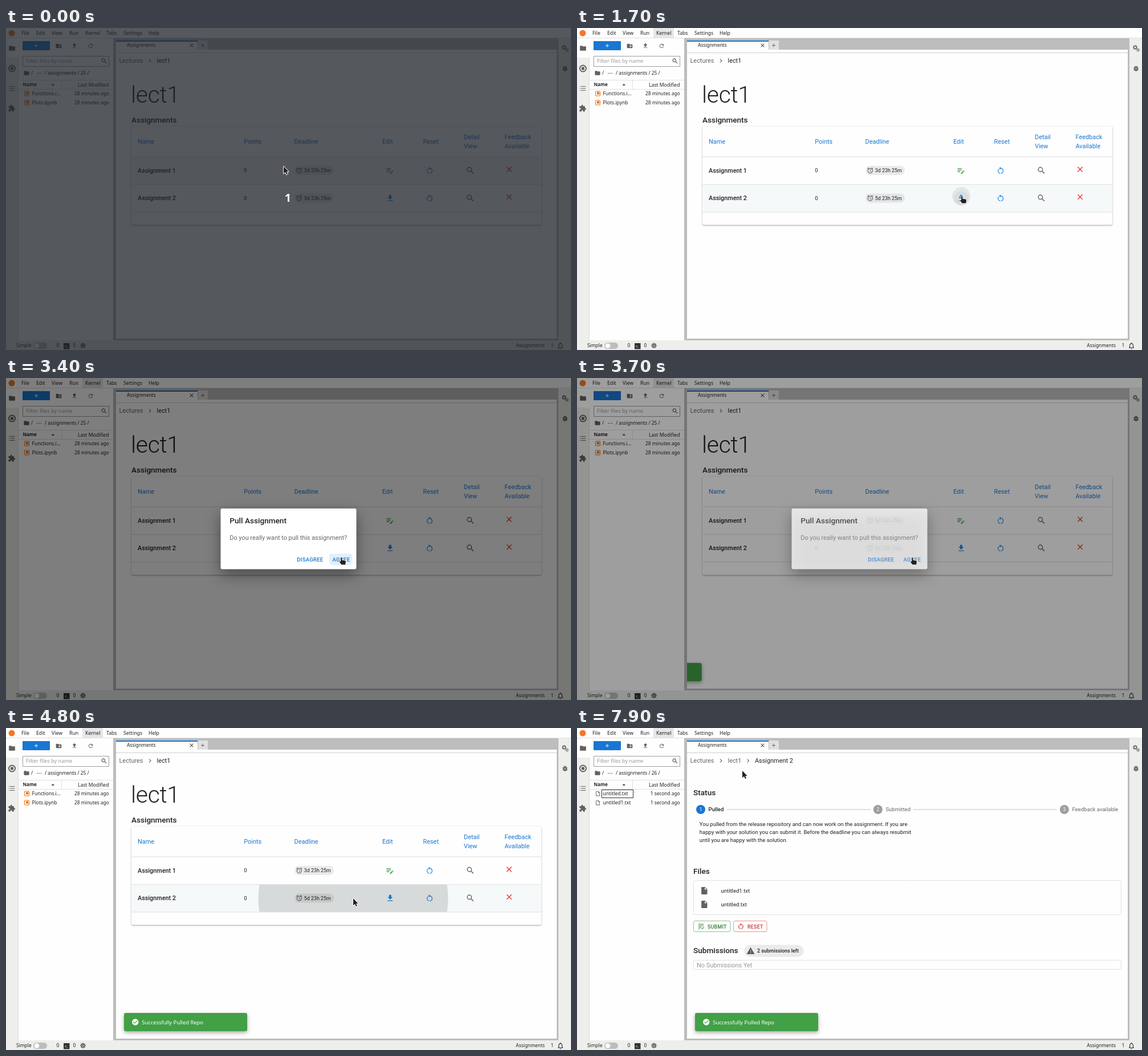
Animation of 991 by 565 pixels, one loop 8000 ms. Source, as an HTML page with a canvas:

```html
<!DOCTYPE html>
<html lang="en">
<head>
<meta charset="utf-8">
<title>Assignments</title>
<style>
html, body { margin: 0; width: 100%; height: 100%; overflow: hidden; background: #fff; }
canvas { display: block; width: 991px; height: 565px; }
</style>
</head>
<body>
<canvas id="stage"></canvas>
<script>
const W = 991, H = 565, LOOP = 8000, STEP = 100;
const canvas = document.getElementById('stage');
const c = canvas.getContext('2d');
const dpr = window.devicePixelRatio || 1;
canvas.width = W * dpr;
canvas.height = H * dpr;

const INK = '#212121', GREY = '#616161', BLUE = '#1976d2', SKY = '#1e88e5', RED = '#e53935', GREEN = '#43a047';
const LINE = '#e0e0e0', BAR = '#eeeeec', DOCK = '#bdbdbd', PAPER = '#fefefe';
const UI = '"Noto Sans", "Open Sans", sans-serif', BODY = 'Roboto, sans-serif';

// Icons on a 24 unit grid
const ICONS = {
  folder: 'M10 4H4c-1.1 0-2 .9-2 2v12c0 1.1.9 2 2 2h16c1.1 0 2-.9 2-2V8c0-1.1-.9-2-2-2h-8l-2-2z',
  addFolder: 'M20 6h-8l-2-2H4c-1.1 0-2 .9-2 2v12c0 1.1.9 2 2 2h16c1.1 0 2-.9 2-2V8c0-1.1-.9-2-2-2zm-1 8h-3v3h-2v-3h-3v-2h3V9h2v3h3v2z',
  search: 'M15.5 14h-.8l-.3-.3A6.5 6.5 0 1 0 13.7 14.4l.3.3v.8l5 5 1.5-1.5zM9.5 14a4.5 4.5 0 1 1 0-9 4.5 4.5 0 0 1 0 9z',
  close: 'M19 6.4L17.6 5 12 10.6 6.4 5 5 6.4 10.6 12 5 17.6 6.4 19 12 13.4 17.6 19 19 17.6 13.4 12z',
  add: 'M19 13h-6v6h-2v-6H5v-2h6V5h2v6h6z',
  download: 'M5 20h14v-2H5zM19 9h-4V3H9v6H5l7 7z',
  upload: 'M5 20h14v-2H5zM5 10h4v6h6v-6h4l-7-7z',
  refresh: 'M17.65 6.35A8 8 0 1 0 19.73 14h-2.08A6 6 0 1 1 16.2 7.8L13 11h7V4z',
  restart: 'M12 5V2L8 6l4 4V7a6 6 0 0 1 1 11.9v2A8 8 0 0 0 12 5zM6 13c0-1.65.67-3.15 1.76-4.24L6.34 7.34A8 8 0 0 0 11 20.93v-2.02A6 6 0 0 1 6 13z',
  alarm: 'M22 5.7l-4.6-3.8-1.3 1.5 4.6 3.9zM7.9 3.4L6.6 1.9 2 5.7l1.3 1.5zM12.5 8H11v6l4.7 2.9.8-1.3-4-2.3zM12 4a9 9 0 1 0 0 18 9 9 0 0 0 0-18zm0 16a7 7 0 1 1 0-14 7 7 0 0 1 0 14z',
  done: 'M12 2a10 10 0 1 0 0 20 10 10 0 0 0 0-20zm-2 15l-5-5 1.4-1.4 3.6 3.6 7.6-7.6L19 8z',
  file: 'M6 2a2 2 0 0 0-2 2v16a2 2 0 0 0 2 2h12a2 2 0 0 0 2-2V8l-6-6zm7 7V3.5L18.5 9z',
  page: 'M6 2a2 2 0 0 0-2 2v16a2 2 0 0 0 2 2h12a2 2 0 0 0 2-2V8l-6-6zm0 2h7v5h5v11H6z',
  warning: 'M1 21h22L12 2zm12-3h-2v-2h2zm0-4h-2v-4h2z',
  editNote: 'M3 10h11v2H3zM3 6h11v2H3zM3 14h7v2H3zM18 12.9l1.4-1.4 2.2 2.1-1.5 1.4zM17.3 13.6L12 18.9V21h2.1l5.3-5.3z',
  submit: 'M3 3h18v2H3zM3 8h18v2H3zM3 13h10v2H3zM3 18h7v2H3zM21.5 13l1.4 1.4-6.4 6.4-4-4 1.4-1.4 2.6 2.6z',
  list: 'M7 5h14v2H7zM7 11h14v2H7zM7 17h14v2H7zM3 5h2v2H3zM3 11h2v2H3zM3 17h2v2H3z',
  puzzle: 'M20.5 11H19V7a2 2 0 0 0-2-2h-4V3.5a2.5 2.5 0 0 0-5 0V5H4a2 2 0 0 0-2 2v3.8h1.5a2.7 2.7 0 0 1 0 5.4H2V20c0 1.1.9 2 2 2h3.8v-1.5a2.7 2.7 0 0 1 5.4 0V22H17a2 2 0 0 0 2-2v-4h1.5a2.5 2.5 0 0 0 0-5z',
  bug: 'M20 8h-2.8L15.4 6 17 4.4 15.6 3l-2.2 2.2h-2.8L8.4 3 7 4.4 8.6 6 6.8 8H4v2h2v2H4v2h2v2H4v2h2.8a6 6 0 0 0 10.4 0H20v-2h-2v-2h2v-2h-2v-2h2zm-6 8h-4v-2h4zm0-4h-4v-2h4z',
  bell: 'M12 22a2 2 0 0 0 2-2h-4a2 2 0 0 0 2 2zM18 16v-5c0-3-1.6-5.6-4.5-6.3V4a1.5 1.5 0 0 0-3 0v.7C7.6 5.4 6 8 6 11v5l-2 2v1h16v-1zm-2 1H8v-6c0-2.5 1.5-4.5 4-4.5s4 2 4 4.5z',
  right: 'M10 6L8.6 7.4 13.2 12l-4.6 4.6L10 18l6-6z'
};
for (const k in ICONS) ICONS[k] = new Path2D(ICONS[k]);

const ARROW = new Path2D('M0 0V12.4L2.9 9.8 4.9 14 7 13 5.1 9H8.6Z');
const HAND = new Path2D('M0 .8C0-.5 2.2-.5 2.2.8V4.6L7.6 5.6C8.6 5.8 9 6.4 8.9 7.4L8.2 12.5H1.6L-2 8.2C-2.6 7.2-1.6 6.4-.8 7L0 7.6Z');

// cubic-bezier(.4, 0, .2, 1)
function ease(x) {
  if (x <= 0) return 0;
  if (x >= 1) return 1;
  let lo = 0, hi = 1, s = .5;
  for (let i = 0; i < 24; i++) {
    s = (lo + hi) / 2;
    const q = 1 - s;
    if (1.2 * q * q * s + .6 * q * s * s + s * s * s < x) lo = s; else hi = s;
  }
  return s * s * (3 - 2 * s);
}

function box(x, y, w, h, fill, r = 0, stroke) {
  c.beginPath();
  c.roundRect(x, y, w, h, r);
  if (fill) { c.fillStyle = fill; c.fill(); }
  if (stroke) { c.strokeStyle = stroke; c.lineWidth = 1; c.stroke(); }
}
function disc(x, y, r, fill) {
  c.beginPath();
  c.arc(x, y, r, 0, 7);
  c.fillStyle = fill;
  c.fill();
}
function ring(x, y, r, width, color) {
  c.beginPath();
  c.arc(x, y, r, 0, 7);
  c.lineWidth = width;
  c.strokeStyle = color;
  c.stroke();
}
function shadowBox(x, y, w, h, fill, r, blur, dy, alpha) {
  c.save();
  c.shadowColor = `rgba(0,0,0,${alpha})`;
  c.shadowBlur = blur * dpr;
  c.shadowOffsetY = dy * dpr;
  box(x, y, w, h, fill, r);
  c.restore();
}
function clip(x, y, w, h, draw) {
  c.save();
  c.beginPath();
  c.rect(x, y, w, h);
  c.clip();
  draw();
  c.restore();
}
function icon(name, x, y, size, color = GREY) {
  c.save();
  c.translate(x - size / 2, y - size / 2);
  c.scale(size / 24, size / 24);
  c.fillStyle = color;
  c.fill(ICONS[name], 'evenodd');
  c.restore();
}
function write(font, s, x, y, size, color = INK, weight = 400, align = 'left', spacing = 0) {
  c.font = `${weight} ${size}px ${font}`;
  c.textAlign = align;
  c.letterSpacing = spacing + 'px';
  c.fillStyle = color;
  c.fillText(s, x, y + size * .355);
}
const ui = (...a) => write(UI, ...a);
const body = (...a) => write(BODY, ...a);
const caps = (s, x, y, size, color) => body(s, x, y, size, color, 500, 'left', size * .0286);

function gear(x, y, r) {
  ring(x, y, r * .68, r * .4, GREY);
  for (let i = 0; i < 8; i++) {
    const a = i * Math.PI / 4;
    disc(x + Math.cos(a) * r, y + Math.sin(a) * r, r * .24, GREY);
  }
}

function ripple(t, start, release, x, y, radius, gain, rgb = '0,0,0') {
  if (t < start) return;
  const k = ease((t - start) / 550);
  const a = gain * (.1 + .2 * k) * (1 - ease((t - release) / 550));
  if (a > 0) disc(x, y, radius * k, `rgba(${rgb},${a})`);
}

const PATH = [
  [0, 487, 243], [400, 487, 243], [1200, 674, 295], [2000, 674, 295], [2500, 601, 304], [2900, 587, 315],
  [4200, 587, 315], [4400, 609, 299], [6400, 609, 299], [6500, 605, 296], [6900, 440, 176],
  [7000, 440, 176], [7600, 309, 98], [7800, 309, 98], [7900, 290, 75], [8000, 290, 75]
];
function pointerAt(t) {
  const i = PATH.findIndex(p => p[0] > t);
  const [t0, x0, y0] = PATH[i - 1], [t1, x1, y1] = PATH[i];
  const k = (t - t0) / (t1 - t0);
  return { x: x0 + (x1 - x0) * k, y: y0 + (y1 - y0) * k };
}

function drawMenu(t) {
  box(0, 0, W, 17, PAPER);
  box(0, 17, W, 1, LINE);
  disc(10, 9, 5.5, '#f37726');
  if (t >= 100) box(134, 0, 36, 17, '#e6e6e6');
  const items = { File: 27, Edit: 53, View: 80, Run: 111, Kernel: 139, Tabs: 176, Settings: 206, Help: 250 };
  for (const s in items) ui(s, items[s], 9, 8.7);
}

function drawSidebars() {
  box(0, 18, 22, 530, BAR);
  box(0, 18, 22, 34, PAPER);
  box(21, 52, 1, 496, '#dcdcdc');
  icon('folder', 10.5, 35.5, 13);
  disc(10.5, 71, 6.5, GREY);
  disc(10.5, 71, 4.6, BAR);
  box(8, 68.5, 5, 5, GREY);
  icon('list', 10, 106, 14);
  icon('puzzle', 10, 141, 13.5);
  box(969, 18, 22, 530, BAR);
  gear(979, 34, 3.4);
  gear(984, 38.5, 2.5);
  icon('bug', 980.5, 71, 12.5);
}

function drawStatus() {
  box(0, 548, W, 17, BAR);
  ui('Simple', 18, 557, 8.4);
  box(48, 552, 24, 11, DOCK, 5.5);
  disc(54, 557.5, 4.3, '#fff');
  ui('0', 88.5, 557, 8.5);
  box(101, 553, 10.5, 10.5, '#333');
  ui('s_', 103, 558, 6, '#fff');
  ui('0', 117.5, 557, 8.5);
  gear(135, 557.3, 4);
  disc(135, 557.3, 1.2, GREY);
  ui('Assignments', 945, 557, 8.4, INK, 400, 'right');
  ui('1', 955.5, 557, 8.5);
  icon('bell', 972.5, 557.5, 14, '#333');
}

function drawFiles(pulled) {
  box(22, 18, 166, 530, PAPER);
  box(29, 23, 48, 16, BLUE, 1);
  icon('add', 53, 31, 10, '#fff');
  icon('addFolder', 92.5, 31.5, 11.5);
  icon('upload', 120, 31, 11.5);
  icon('refresh', 148.5, 31.5, 11);
  box(29.5, 49.5, 151, 18, null, 0, '#9e9e9e');
  ui('Filter files by name', 35, 58, 9.2, '#9a9a9a');
  icon('search', 172, 58, 12, '#424242');
  icon('folder', 36, 79, 11);
  ui('/', 44, 79, 8.4);
  for (let i = 0; i < 3; i++) disc(55 + i * 3.2, 79.5, .8, '#424242');
  ui(`/ assignments / ${pulled ? 26 : 25} /`, 68, 79, 8.4);
  box(22, 91, 166, 1, LINE);
  box(22, 107, 166, 1, LINE);
  box(97, 92, 1, 15, LINE);
  ui('Name', 29.5, 99, 8.1, INK, 600);
  c.fillStyle = '#424242';
  c.fill(new Path2D('M79.5 100.8L82.3 97.8L85.1 100.8Z'));
  ui('Last Modified', 180.5, 100, 8.6, INK, 400, 'right');
  const names = pulled ? ['untitled.txt', 'untitled1.txt'] : ['Functions.i...', 'Plots.ipynb'];
  names.forEach((name, i) => {
    const y = 115 + i * 16;
    if (pulled) icon('page', 36.5, y, 10.5);
    else {
      box(32.5, y - 4, 8, 8, null, .5, '#ef6c00');
      c.fillStyle = '#ef6c00';
      c.fill(new Path2D(`M35 ${y - 2.5}H39V${y + 2.5}L37 ${y + .8}L35 ${y + 2.5}Z`));
    }
    ui(name, 45.5, y, 8.5);
    ui(pulled ? '1 second ago' : '28 minutes ago', 180.5, y, 8.3, INK, 400, 'right');
  });
  if (pulled) box(43.5, 108.5, 55, 14, null, 0, '#333');
}

function drawDock() {
  box(188, 18, 781, 530, DOCK);
  box(193, 38, 773, 507, PAPER);
  box(193, 22, 143, 17, PAPER);
  box(193, 22, 143, 2, BLUE);
  box(193, 43, 773, 1, '#cfcfcf');
  ui('Assignments', 212, 30.5, 8.4);
  icon('close', 325.5, 30.5, 11, '#424242');
  box(337, 22, 17, 16, LINE);
  icon('add', 345, 30.5, 10);
}

function crumbs(names) {
  const xs = [198.5, 264.5, 312];
  names.forEach((s, i) => {
    const last = i === names.length - 1;
    body(s, xs[i], 57.5, 10.9, last ? INK : '#666');
    if (!last) icon('right', i ? 300 : 252.5, 57.5, 13);
  });
}

function drawRow(t, n, hovered) {
  const top = n === 1 ? 226.5 : 275, y = n === 1 ? 250 : 298.5;
  if (hovered) box(220.5, top, 718, 47.5, '#f6f9f9');
  body('Assignment ' + n, 231, y, 10.8, INK, 500);
  body('0', 417.2, y, 9.5);
  box(506, y - 8, 69, 16, 'rgba(0,0,0,.08)', 8);
  icon('alarm', 514.3, y, 12.2, '#555');
  body(n === 1 ? '3d 23h 25m' : '5d 23h 25m', 522.8, y + .3, 8.86);
  if (n === 1) icon('editNote', 673.5, y, 16, GREEN);
  else icon('download', 673.8, y, 15.5, SKY);
  icon('restart', 743, y, 15.5, SKY);
  icon('search', 814.5, y, 16.4);
  icon('close', 882.5, y - 2, 16, RED);
}

function drawLecture(t, mouse) {
  crumbs(['Lectures', 'lect1']);
  body('lect1', 219, 116.5, 40.9, INK, 300, 'left', -.34);
  body('Assignments', 220, 161, 13.5, INK, 500);
  shadowBox(220, 172.5, 719, 173, PAPER, 3, 2.5, 1, .38);
  const heads = [['Name', 231], ['Points', 417.3], ['Deadline', 505.5], ['Edit', 660], ['Reset', 731.5]];
  for (const [s, x] of heads) body(s, x, 199, 10.9, BLUE);
  [['Detail', 'View', 803], ['Feedback', 'Available', 874.5]].forEach(([a, b, x]) => {
    body(a, x, 191, 10.9, BLUE);
    body(b, x, 207, 10.9, BLUE);
  });
  const free = t < 1850 || t >= 4000;
  drawRow(t, 1, free && mouse.y < 274);
  drawRow(t, 2, free && mouse.y >= 274);
  for (const y of [225.5, 274, 322.5]) box(220, y, 719, 1, LINE);

  if (t >= 1100 && t < 1850) disc(674, 299, 13, 'rgba(0,0,0,.04)');
  clip(220, 275, 719, 47.5, () => {
    ripple(t, 1637, 1900, 674, 295, 454, .7);
    ripple(t, 1600, 1900, 674, 299, 13, .8);
    ripple(t, 4623, 4730, 609, 299, 390, .7);
  });
}

function drawStep(n, x, label, active) {
  disc(x, 143, 8, active ? BLUE : '#9e9e9e');
  body(n, x, 143, 8.2, '#fff', 400, 'center');
  body(label, x + 13.6, 143, 9.54, active ? INK : '#666', active ? 500 : 400);
}

function drawAssignment(t) {
  crumbs(['Lectures', 'lect1', 'Assignment 2']);
  body('Status', 204, 113, 13.6, INK, 500);
  drawStep('1', 217, 'Pulled', true);
  drawStep('2', 527.8, 'Submitted');
  drawStep('3', 854.8, 'Feedback available');
  box(263, 142.5, 252, 1, DOCK);
  box(590, 142.5, 251, 1, DOCK);
  ['You pulled from the release repository and can now work on the assignment. If you are',
    'happy with your solution you can submit it. Before the deadline you can always resubmit',
    'until you are happy with the solution.'
  ].forEach((s, i) => body(s, 214.8, 168.5 + i * 14, 9.54));

  body('Files', 204, 251.5, 13.6, INK, 500);
  box(204.5, 267.5, 750, 60, null, 3, LINE);
  if (t >= 5200) {
    if (t < 6600) box(205, 297.5, 749, 24, '#f5f5f5');
    ['untitled1.txt', 'untitled.txt'].forEach((s, i) => {
      icon('file', 223.3, 285.5 + i * 24, 15.5);
      body(s, 252.5, 285.5 + i * 24, 9.54);
    });
  }
  box(204.5, 338.5, 64.5, 19, null, 3, 'rgba(46,125,50,.5)');
  icon('submit', 217.5, 348.5, 12.5, '#2e7d32');
  caps('SUBMIT', 229, 348.5, 8.86, '#2e7d32');
  box(274.5, 338.5, 58.5, 19, null, 3, 'rgba(211,47,47,.5)');
  icon('restart', 287.5, 348, 13, '#d32f2f');
  caps('RESET', 299, 348.5, 8.86, '#d32f2f');

  body('Submissions', 204, 390.5, 13.6, INK, 500);
  box(293, 380.5, 104.5, 21, '#ebebeb', 10.5);
  icon('warning', 304.5, 391, 15, '#555');
  body('2 submissions left', 316, 391.3, 8.86, INK, 500);
  box(204.5, 407.5, 750, 16, null, 2, LINE);
  body('No Submissions Yet', 210, 415.7, 10.9, '#999');
}

function drawSnack(t) {
  if (t < 3690) return;
  const p = Math.min(1, (t - 3690) / 225);
  clip(193, 44, 773, 501, () => {
    c.translate(-230 * Math.pow(1 - p, 2.6), 0);
    shadowBox(207, 500, 216, 32, '#42a046', 3, 7, 2.5, .35);
    icon('done', 226.8, 516, 13.6, '#fff');
    ui('Successfully Pulled Repo', 238.3, 516.3, 9.4, '#fff');
  });
}

function drawDialog(t) {
  const leave = ease((t - 3651) / 195);
  const dim = ease((t - 1882) / 225) - leave;
  const show = ease((t - 1858) / 225) - leave;
  if (dim > 0) box(0, 0, W, H, `rgba(0,0,0,${.5 * dim})`);
  if (show <= 0) return;
  c.save();
  c.globalAlpha = show;
  shadowBox(376.5, 229, 238, 106.5, '#fff', 3, 26, 10, .4);
  body('Pull Assignment', 392.3, 250, 13.6, INK, 500);
  body('Do you really want to pull this assignment?', 392.3, 279.8, 10.9, '#666');
  if (t >= 2600 && t < 3600) box(567, 308.5, 41.5, 20, 'rgba(25,118,210,.05)', 3);
  clip(567, 308.5, 41.5, 20, () => ripple(t, 3130, 3150, 587, 316, 26, 1, '25,118,210'));
  caps('DISAGREE', 510.2, 318.5, 9.54, BLUE);
  caps('AGREE', 572.6, 318.5, 9.54, BLUE);
  c.restore();
}

function drawCountdown(t) {
  const a = 1 - t / 300;
  if (a <= 0) return;
  box(0, 0, W, H, `rgba(28,32,38,${.75 * a})`);
  c.globalAlpha = a;
  ui('1', 494.5, 298, 20, '#fff', 600, 'center');
  c.globalAlpha = 1;
}

function drawPointer(t, { x, y }) {
  const hand = (t >= 1100 && t < 1900) || (t >= 2600 && t < 4000) || (t >= 5000 && t < 6600);
  const shape = hand ? HAND : ARROW;
  c.save();
  c.translate(x, y);
  c.lineJoin = 'round';
  c.lineWidth = 1.8;
  c.strokeStyle = '#fff';
  c.stroke(shape);
  c.fillStyle = '#222';
  c.fill(shape);
  c.restore();
}

function draw(t) {
  const mouse = pointerAt(t);
  c.setTransform(dpr, 0, 0, dpr, 0, 0);
  box(0, 0, W, H, PAPER);
  drawMenu(t);
  drawSidebars();
  drawFiles(t >= 5300);
  drawDock();
  if (t < 5000) drawLecture(t, mouse); else drawAssignment(t);
  drawStatus();
  drawSnack(t);
  drawDialog(t);
  drawCountdown(t);
  drawPointer(t, mouse);
}

const origin = performance.now();
function frame() {
  const t = (performance.now() - origin) % LOOP;
  draw(Math.floor(t / STEP) * STEP);
  requestAnimationFrame(frame);
}
frame();
</script>
</body>
</html>
```
